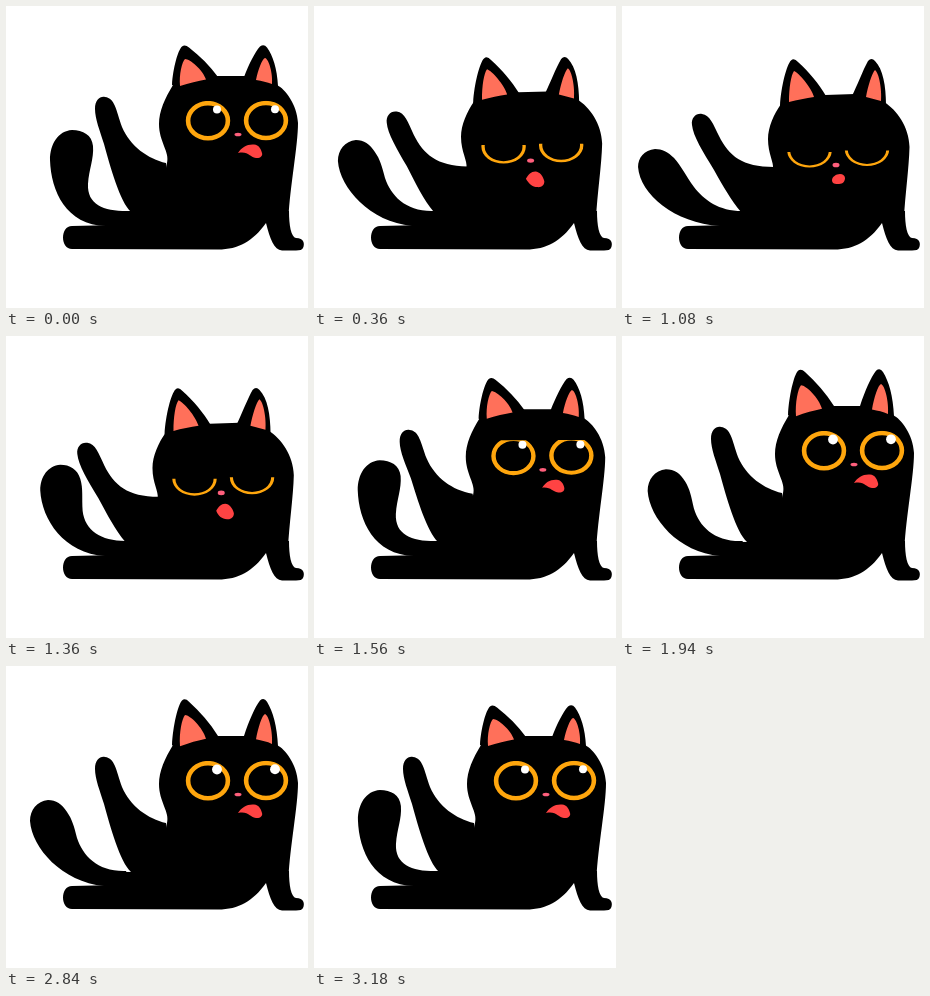
Write an HTML page with a canvas that moves like this. It is 302 px wide and 302 px high and loops after 3200 ms.

```html
<!DOCTYPE html>
<html lang="en">
<head>
<meta charset="utf-8">
<title>Black cat</title>
<style>
  html, body { margin: 0; width: 100%; height: 100%; overflow: hidden; background: #fff; }
  canvas { display: block; width: 302px; height: 302px; }
</style>
</head>
<body>
<canvas id="stage"></canvas>
<script>
const SIZE = 302, LOOP = 3200;
const BLACK = '#000', ORANGE = '#ffa60d', PINK = '#ff705a', RED = '#ff4343', ROSE = '#ff5f7c';

const canvas = document.getElementById('stage');
const ctx = canvas.getContext('2d');
const ratio = window.devicePixelRatio || 1;
canvas.width = canvas.height = Math.round(SIZE * ratio);

const BODY = 'M66 220 L110 219 L116 206 L283 205 C283 219 285 231 290 232 C298 232 299 238 297 242 ' +
  'Q296 244.5 290 244.5 L276 244.5 C268 244 264 233 260 217 C247 235 233 243.5 212 243.5 L66 243 C54 243 54 220 66 220 Z';

// Each pair is [sitting up, leaning down].
const HEAD = [
  'M161 157 C164 146 153 136 153 118 C153 105 159 92 167 79 L211 70 L239 70 L271 79 C279 83 291 98 292 117 C292 140 284 180 282.5 212 L150 217 Z',
  'M151 163 C152 156 146 148 146 133 C146 121 152 108 159 98 L203 89 L233 88 L262 96 C275 104 287 121 287.5 141 C287 162 283 190 282 212 L150 217 Z'
];
const LEG = [
  'M125 206 C114 196 104 160 98 138 C94 125 89 113 89 103 C89 94 94 90 99 91 C109 92 110 104 116 121 C124 140 142 153 160 157 L170 220 L125 220 Z',
  'M119 206 C109 194 101 180 92 164 C81 146 71 130 70 119 C69 112 74 107 80 108 C88 109 91 118 97 130 C107 150 120 161 152 161 L170 220 L119 220 Z'
];
const EARS = [
  'M166 79 C167 62 172 44 176 40.5 Q179 38 183 41.5 C194 50 204 60 212 71 L205 90 Z ' +
  'M238 71 C243 58 249 46 254 40.5 Q258 37.5 261 41.5 C267 50 271 62 272 80 L250 90 Z',
  'M158 100 C159 80 165 58 169 54.5 Q172 51.5 176 56 C187 66 197 78 204 90 L198 108 Z ' +
  'M230 90 C235 80 241 64 246 55 Q249.5 51 253 55 C261 63 264 80 264 99 L240 108 Z'
];
const INNER_EARS = [
  'M174 80 C173 68 176 56 179 53 C184 53 197 64 200 73.5 C192 75 183 77 174 80 Z ' +
  'M250 74 C252 64 256 53 259 52 C263 53 267 68 266 78 C261 76 256 75 250 74 Z',
  'M167 96 C167 82 169 69 172 65 C177 67 189 81 192 91 C184 92 175 94 167 96 Z ' +
  'M244 91 C246 80 250 67 253 64 C257 67 260 83 259 95 C254 94 249 92 244 91 Z'
];

const TONGUE_UP = 'M232 147 C236 141 241 138 248 138.5 C253 139 255 143 256 147 C257 150 254 152.5 250 152 C243 151 243 145 232 147 Z';
const TONGUE_IN = 'M210 174 C210 171 214 168 218 168 C221 168 223 170 223 172 C223 175 221 178 217 178 C213 178 210 178 210 174 Z';
const TONGUE_OUT = 'M208.5 177 C211 173 213 170 217 170 C221 170 225 175 226 180 C226 184 223 186.5 219 186 C214 186 210 183 208.5 177 Z';

const TAIL = [
  [0, 'M126 205 C100 206 81 200 82 178 C83 163 88 153 87 140 C86 129 77 124 66 124 C52 125 44 138 44 154 C45 185 60 219 100 220 L126 220 Z'],
  [.42, 'M120 205 C92 206 77 190 71 172 C68 160 66 153 61 146 C56 138 50 134 42 134 C31 135 24 144 24 155 C26 182 56 216 98 220 L126 220 Z'],
  [.727, 'M120 205 C97 205 82 194 72 181 C64 170 59 160 52 152 C46 146 40 143 33 143 C22 144 16 152 16 161 C18 188 52 217 98 220 L126 220 Z'],
  [1, 'M122 205 C101 205 87 200 75 192 C63 182 57 171 46 163 C39 158 33 156 26 156 C12 157 5 164 5.5 174 C8 198 45 217 98 220 L126 220 Z']
];

const NUMBER = /-?\d+(\.\d+)?/g;
const lerp = (a, b, k) => a + (b - a) * k;
const clamp = v => Math.min(1, Math.max(0, v));
const wave = turn => (1 - Math.cos(2 * Math.PI * turn)) / 2;
const ease = (t, from, to) => wave(clamp((t - from) / (to - from)) / 2);
const bump = (t, mid, half) => wave(clamp((t - mid + half) / (2 * half)));

function mix(a, b, k) {
  const ends = b.match(NUMBER);
  let i = 0;
  return a.replace(NUMBER, n => lerp(+n, +ends[i++], k).toFixed(3));
}

function fill(path, color) {
  ctx.fillStyle = color;
  ctx.fill(new Path2D(path));
}

function oval(x, y, rx, ry, color) {
  ctx.fillStyle = color;
  ctx.beginPath();
  ctx.ellipse(x, y, rx, ry, 0, 0, 2 * Math.PI);
  ctx.fill();
}

function tailPath(swing) {
  let i = 0;
  while (i < TAIL.length - 2 && swing > TAIL[i + 1][0]) i++;
  const [from, a] = TAIL[i], [to, b] = TAIL[i + 1];
  return mix(a, b, (swing - from) / (to - from));
}

function drawEye(x, y, lean, perk) {
  const rx = 22.2, ry = lerp(19.8, 16.5, lean), line = lerp(4.6, 2.1, lean);
  const lid = y - ry * (1 - lean) + lean;
  ctx.save();
  ctx.beginPath();
  ctx.rect(x - 30, lid, 60, 60);
  ctx.clip();

  // Ring, drawn as one shape so the lid edge stays clean.
  ctx.beginPath();
  ctx.ellipse(x, y, rx, ry, 0, 0, 2 * Math.PI);
  ctx.ellipse(x, y, rx - line * lerp(1, 1.4, lean), ry - line, 0, 0, 2 * Math.PI);
  ctx.fillStyle = ORANGE;
  ctx.fill('evenodd');

  const r = 4 + perk;
  if (lean < .6) oval(x + 9, y - 11.2, r, r, '#fff');
  ctx.restore();
}

function draw(t) {
  const lean = ease(t, 0, 480) - ease(t, 1300, 1660);
  const perk = bump(t, 1880, 280) + bump(t, 2790, 300);
  const lick = 1 - wave((t - 360) / 480);

  ctx.setTransform(ratio, 0, 0, ratio, 0, 0);
  ctx.fillStyle = '#fff';
  ctx.fillRect(0, 0, SIZE, SIZE);

  fill(tailPath(wave(t / 1600)), BLACK);
  fill(BODY, BLACK);
  fill(mix(...LEG, lean), BLACK);
  fill(mix(...HEAD, lean), BLACK);

  // Ears stretch upward from their base.
  ctx.save();
  ctx.translate(0, 78);
  ctx.scale(1, 1 + .17 * perk);
  ctx.translate(0, -78);
  fill(mix(...EARS, lean), BLACK);
  fill(mix(...INNER_EARS, lean), PINK);
  ctx.restore();

  drawEye(lerp(202, 187.5, lean), lerp(114.7, 145, lean), lean, perk);
  drawEye(lerp(260, 245, lean), lerp(114.5, 143.5, lean), lean, perk);
  oval(lerp(232, 214, lean), lerp(128.5, 159, lean), 3.5, lerp(1.8, 2.3, lean), ROSE);
  fill(mix(TONGUE_UP, mix(TONGUE_IN, TONGUE_OUT, lick), lean), RED);
}

const start = performance.now();
function tick() {
  draw((performance.now() - start) % LOOP);
  requestAnimationFrame(tick);
}
tick();
</script>
</body>
</html>
```
